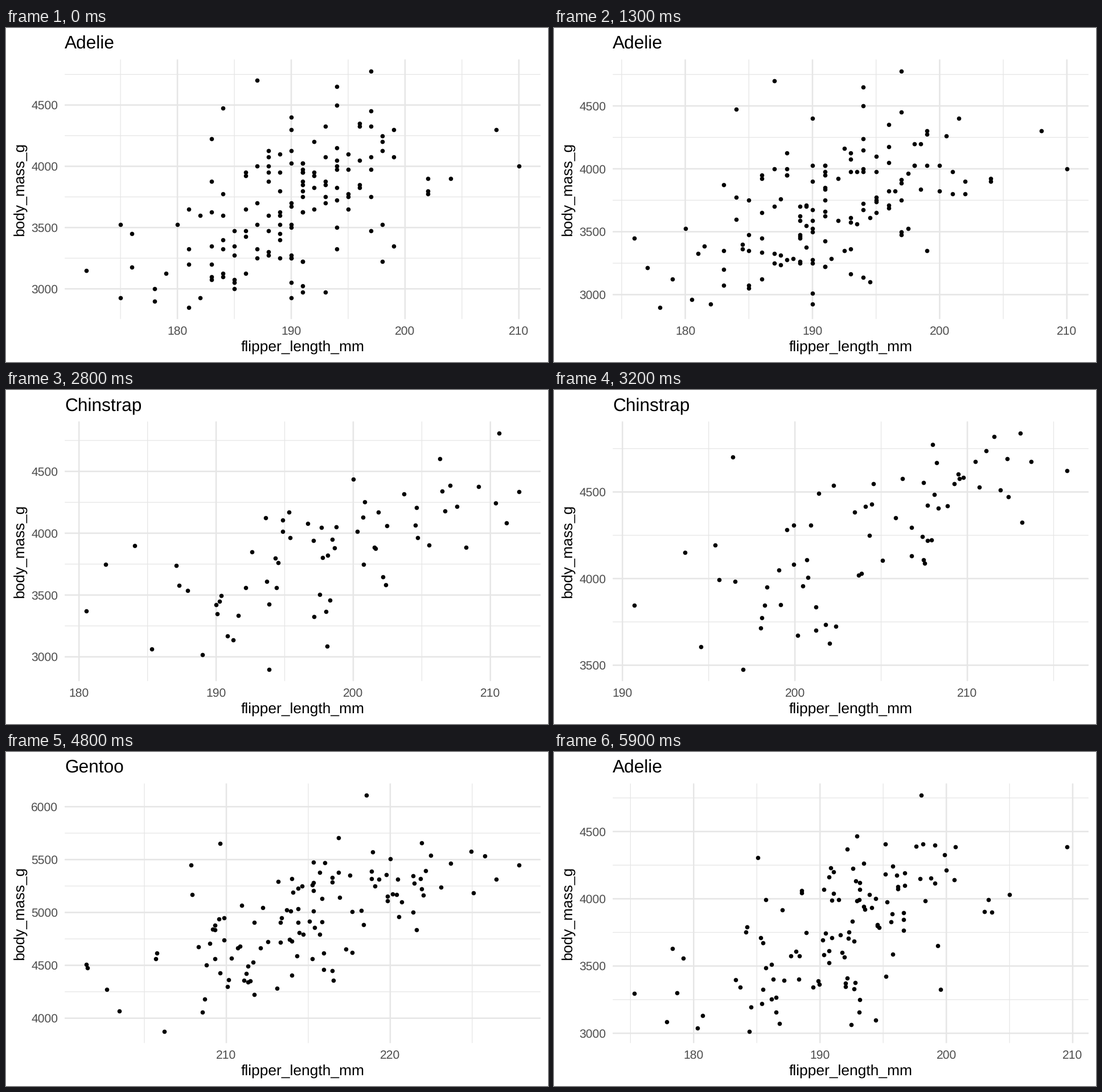
A matplotlib script that plays this animation: 952x588 px, repeating every 6000 ms.

```python
import itertools
import math

import matplotlib.pyplot as plt
import numpy as np
from matplotlib.animation import FuncAnimation
from matplotlib.collections import LineCollection

plt.rcParams["font.family"] = "Liberation Sans"
plt.rcParams["text.hinting"] = "none"

W, H, DPI = 952, 588, 100
PT = 72 / DPI
FRAMES, INTERVAL = 60, 100
LEFT, RIGHT, TOP, BOTTOM = 103.2, 938.8, 55.5, 512.3
GRID, LABEL = "#e6e6e6", "#4d4d4d"

# (flipper, mass) of each crowd: female mean, step to the male mean, spread.
# Key birds, by row, sit on the rim of the crowd and set the view.
SPECIES = {
    "Adelie": dict(
        count=146, mean=(187.8, 3369), step=(4.6, 674), spread=(6, 305), mass_unit=25,
        keys={17: (189, 3800), 23: (172, 3150), 39: (185, 3000), 52: (181, 2850),
              62: (190, 3050), 89: (208, 4300), 92: (178, 2900), 96: (183, 3075),
              103: (197, 4775), 116: (176, 3450), 123: (210, 4000)}),
    "Chinstrap": dict(
        count=68, mean=(191.7, 3527), step=(8.2, 412), spread=(5.9, 320), mass_unit=25,
        keys={6: (178, 3250), 16: (197, 3300), 17: (181, 3700), 22: (187, 2900),
              29: (205, 4550), 37: (210, 4800), 38: (192, 2700), 40: (210, 3950),
              47: (212, 4300), 62: (195, 3650)}),
    "Gentoo": dict(
        count=119, mean=(212.7, 4680), step=(8.8, 805), spread=(4.8, 298), mass_unit=50,
        keys={6: (211, 4800), 16: (210, 4150), 17: (221, 6300), 22: (213, 4400),
              23: (215, 5050), 29: (222, 5250), 39: (208, 3950), 40: (225, 5700),
              52: (225, 5000), 62: (231, 5650), 89: (228, 5400), 96: (203, 4625),
              103: (210, 4700)}),
}
NAMES, SPECS = list(SPECIES), list(SPECIES.values())

# Last resting frame of each species and first resting frame of the next.
LEGS = [(6, 20), (27, 40), (47, 60)]
TITLE_CHANGES = (14, 35, 55)

rng = np.random.default_rng(12)


def key_points(spec):
    pts = np.full((spec["count"], 2), np.nan)
    for row, xy in spec["keys"].items():
        pts[row] = xy
    return pts


def sample(spec):
    """A random crowd of alternating females and males around the key birds."""
    n = spec["count"]
    male = (np.arange(n) % 2)[:, None]
    z = rng.standard_normal((n, 2))
    z[:, 1] = 0.4 * z[:, 0] + 0.92 * z[:, 1]
    pts = spec["mean"] + male * spec["step"] + z * spec["spread"]
    unit = np.array([1, spec["mass_unit"]])
    keys = key_points(spec)
    return np.where(np.isnan(keys), np.round(pts / unit) * unit, keys)


def tween(groups, frame):
    """Rows move in pairs; surplus rows wait until the move is over."""
    leg = next(i for i, (_, end) in enumerate(LEGS) if frame < end)
    start, end = LEGS[leg]
    a, b = groups[leg], groups[(leg + 1) % 3]
    if frame <= start:
        return a
    t = (frame - start) / (end - start)
    n = min(len(a), len(b))
    return np.vstack([a[:n] + (b[:n] - a[:n]) * t, a[n:]])


def limits(pts):
    return np.nanmin(pts, axis=0), np.nanmax(pts, axis=0)


def build_groups(tries=150):
    """Of many random crowds keep, row by row, what best stays inside the rim."""
    keys = [key_points(s) for s in SPECS]
    rims = [limits(tween(keys, k)) for k in range(FRAMES)]

    def overshoot(groups):
        over = np.zeros(len(groups[0]))
        for k, (lo, hi) in enumerate(rims):
            p = tween(groups, k)
            beyond = np.maximum(0, np.maximum(lo - p, p - hi)) / (hi - lo)
            over[:len(p)] += beyond.sum(axis=1)
        return over

    best = [sample(s) for s in SPECS]
    best_over = overshoot(best)
    for _ in range(tries):
        trial = [sample(s) for s in SPECS]
        over = overshoot(trial)
        better = over < best_over
        for kept, new in zip(best, trial):
            rows = better[:len(kept)]
            kept[rows] = new[rows]
        best_over = np.minimum(over, best_over)
    return best


def step_score(lo, hi, step, simplicity):
    """Rate a tick step by its simplicity, coverage and density."""
    scores = []
    for down, up in itertools.product((math.floor, math.ceil), repeat=2):
        first, last = down(lo / step) * step, up(hi / step) * step
        cover = 1 - 50 * ((hi - last) ** 2 + (lo - first) ** 2) / (hi - lo) ** 2
        ratio = (max(hi, last) - min(lo, first)) / (4 * step)
        dense = 2 - max(ratio, 1 / ratio)
        scores.append(0.25 * simplicity + 0.2 * cover + 0.5 * dense)
    return max(scores)


def flipper_step(lo, hi):
    return 10 if step_score(lo, hi, 10, 1) > step_score(lo, hi, 5, 0.8) else 5


def multiples(lo, hi, step):
    return np.arange(math.ceil(lo / step), math.floor(hi / step) + 1) * step


groups = build_groups()

fig = plt.figure(figsize=(W / DPI, H / DPI), dpi=DPI, facecolor="white")
ax = fig.add_axes([0, 0, 1, 1])
ax.set_xlim(0, W)
ax.set_ylim(H, 0)
ax.axis("off")


def text(x, y, s="", px=26.4, **kw):
    return ax.text(x, y, s, fontsize=px * PT, va="baseline", **kw)


def grid_lines(px):
    lines = LineCollection([], colors=GRID, linewidths=px * PT, zorder=1,
                           capstyle="butt")
    lines.set_snap(False)
    ax.add_collection(lines, autolim=False)
    return lines


minor, major = grid_lines(1.28), grid_lines(2.56)
dots = ax.scatter([], [], s=(7.6 * PT) ** 2, c="black", linewidths=0, zorder=2)
title = text(LEFT, 36, px=31.7)
text((LEFT + RIGHT) / 2, 569.3, "flipper_length_mm", ha="center")
text(32.2, (TOP + BOTTOM) / 2, "body_mass_g", ha="center", rotation=90,
     rotation_mode="anchor")
x_labels = [text(0, 539.5, px=21.1, color=LABEL, ha="center") for _ in range(8)]
y_labels = [text(91.3, 0, px=21.1, color=LABEL, ha="right") for _ in range(8)]


def set_labels(pool, values, places, move):
    for label in pool:
        label.set_visible(False)
    for label, value, place in zip(pool, values, places):
        label.set_visible(True)
        label.set_text(f"{value:.0f}")
        move(label, place)


def draw(frame):
    p = tween(groups, frame)
    lo, hi = limits(p)
    pad = 0.05 * (hi - lo)
    (x0, y0), (x1, y1) = lo - pad, hi + pad

    def px(x):
        return LEFT + (x - x0) / (x1 - x0) * (RIGHT - LEFT)

    def py(y):
        return BOTTOM - (y - y0) / (y1 - y0) * (BOTTOM - TOP)

    def segments(xs, ys):
        return ([[(x, TOP), (x, BOTTOM)] for x in px(xs)]
                + [[(LEFT, y), (RIGHT, y)] for y in py(ys)])

    step = flipper_step(x0, x1)
    xs, ys = multiples(x0, x1, step), multiples(y0, y1, 500)
    major.set_segments(segments(xs, ys))
    minor.set_segments(segments(multiples(x0, x1, step / 2),
                                multiples(y0, y1, 250)))
    set_labels(x_labels, xs, px(xs), lambda label, x: label.set_x(x))
    set_labels(y_labels, ys, py(ys) + 7.5, lambda label, y: label.set_y(y))

    dots.set_offsets(np.column_stack([px(p[:, 0]), py(p[:, 1])]))
    title.set_text(NAMES[sum(frame >= k for k in TITLE_CHANGES) % 3])
    return minor, major, dots, title, *x_labels, *y_labels


anim = FuncAnimation(fig, draw, frames=FRAMES, interval=INTERVAL, repeat=True)
plt.show()
```
